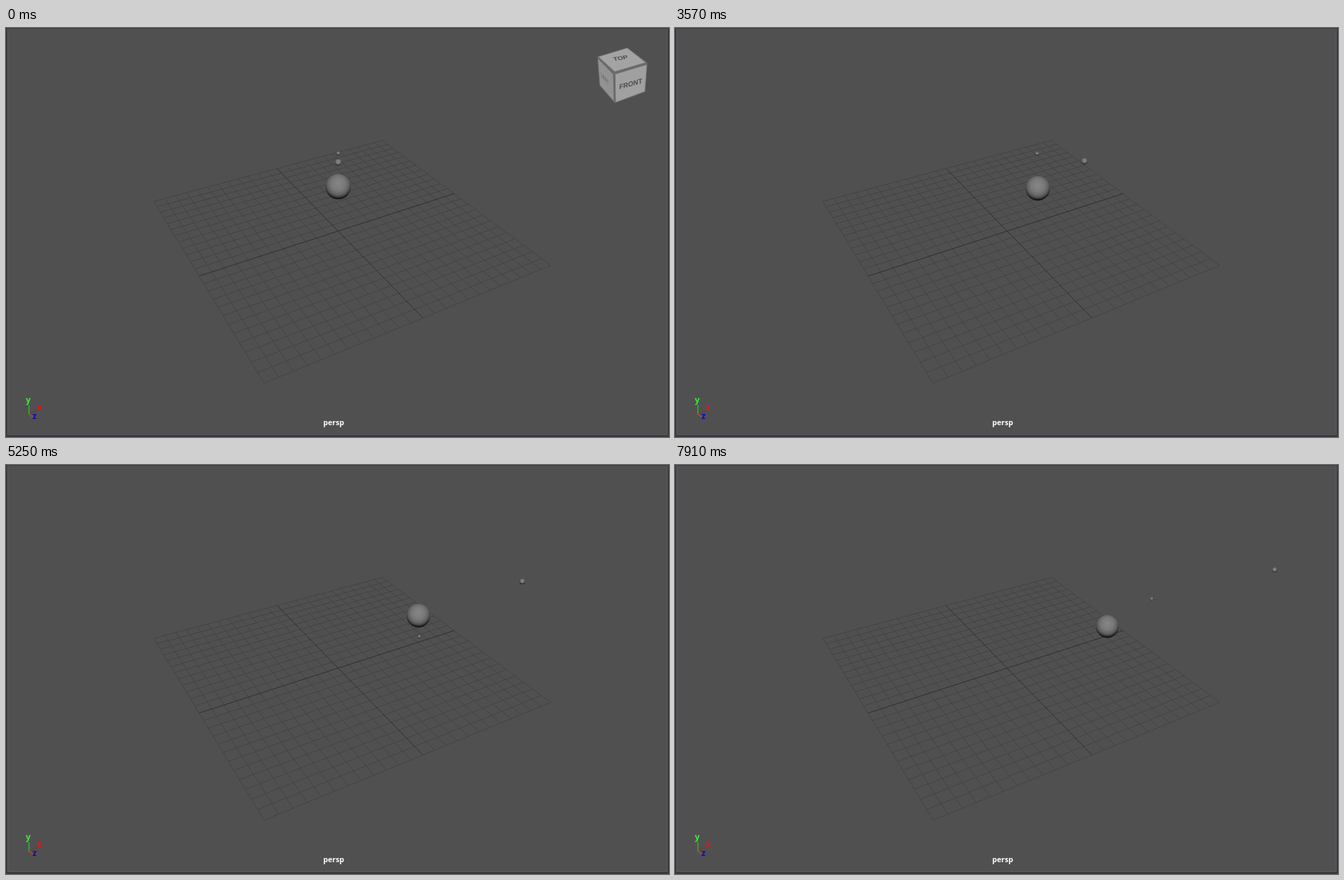
Recreate the animation shown at these times as an HTML page. Size 953 by 588 pixels, loop 8000 ms.

```html
<!DOCTYPE html>
<html lang="en">
<head>
<meta charset="utf-8">
<title>Bouncing balls</title>
<style>
  html, body { margin: 0; width: 100%; height: 100%; overflow: hidden; background: #3a3a3b; }
  svg { display: block; width: 953px; height: 588px; }
  text { text-anchor: middle; font-weight: 700; }
  .label { font-family: "Open Sans", "Noto Sans", sans-serif; }
  .cube { font-family: "Liberation Sans", Arial, sans-serif; fill: #4b4b4b; }
  .grid, .axis, .gizmo { fill: none; stroke-width: 1; }
  .grid { stroke: #434341; }
  .axis { stroke: #2e2e30; }
  .gizmo { stroke-width: 1.3; }
</style>
</head>
<body>
<svg viewBox="0 0 953 588">
  <defs>
    <radialGradient id="shade" cx=".5" cy=".4" r=".6" fx=".5" fy=".37">
      <stop offset="0" stop-color="#868686"/>
      <stop offset=".45" stop-color="#797979"/>
      <stop offset=".7" stop-color="#626262"/>
      <stop offset=".83" stop-color="#454545"/>
      <stop offset=".92" stop-color="#1c1c1c"/>
      <stop offset="1" stop-color="#0a0a0a"/>
    </radialGradient>
  </defs>
  <rect x="2.5" y=".5" width="948" height="584" fill="#505051" stroke="#5c5c68"/>
  <path d="M2 .5H951" stroke="#3e3e36"/>
  <path id="grid" class="grid"/>
  <path id="axis" class="axis"/>
  <g id="balls" fill="url(#shade)"></g>

  <g id="cube">
    <path d="M850 41L893 28L922 50L919 92L875 108L853 83Z" fill="#6b6b6b"/>
    <path d="M852 41.5L893 29L919 49.500L875 62.500Z" fill="#a3a3a3"/>
    <path d="M876 66.500L921 53L918 91L876.500 106.500Z" fill="#a0a0a0"/>
    <path d="M851 44.500L872.500 66.500L873.500 104.500L854 82Z" fill="#929292"/>
    <g class="cube">
      <text transform="matrix(.97 -.16 .2 .72 884 45.800)" font-size="10.500">TOP</text>
      <text transform="matrix(.96 -.27 0 1 898 83.700)" font-size="10">FRONT</text>
      <text transform="matrix(.5 .55 .08 1 861 76)" font-size="9" fill="#666">LEFT</text>
    </g>
  </g>

  <g class="gizmo">
    <path d="M33 542V556" stroke="#2fc22f"/>
    <path d="M33 555.500L45 549" stroke="#9c2626" stroke-dasharray="2 1"/>
    <path d="M33 555L39 560" stroke="#b5541c"/>
  </g>
  <g class="label" font-size="12">
    <text x="32" y="539" fill="#35f035">y</text>
    <text x="48" y="549" fill="#e01818">x</text>
    <text x="41" y="562" fill="#0808c4">z</text>
    <text x="471" y="571" font-size="10.700" fill="#fff">persp</text>
  </g>
</svg>
<script>
const LOOP = 8000, START = 2590, LAST = 7910;
const $ = id => document.getElementById(id);

// World point to screen; s is the size of one unit there.
function project(x, y, z) {
  const s = 917 / (52.8 + .4 * x - .576 * y - .712 * z);
  return {
    x: 477.5 + s * (.872 * x + .49 * z),
    y: 292 - s * (.282 * x + .817 * y - .502 * z),
    s
  };
}

function line(x1, z1, x2, z2) {
  const a = project(x1, 0, z1), b = project(x2, 0, z2);
  return `M${a.x.toFixed(1)} ${a.y.toFixed(1)}L${b.x.toFixed(1)} ${b.y.toFixed(1)}`;
}

function drawGrid() {
  const N = 12;
  let d = '';
  for (let i = -N; i <= N; i++) if (i) d += line(i, -N, i, N) + line(-N, i, N, i);
  $('grid').setAttribute('d', d);
  $('axis').setAttribute('d', line(0, -N, 0, N) + line(-N, 0, N, 0));
}

// Monotone cubic through [time, value] keys.
function curve(keys, t) {
  const n = keys.length - 1;
  if (t <= keys[0][0]) return keys[0][1];
  if (t >= keys[n][0]) return keys[n][1];
  const slope = i => (keys[i + 1][1] - keys[i][1]) / (keys[i + 1][0] - keys[i][0]);
  const tangent = i => {
    if (i === 0) return slope(0);
    if (i === n) return slope(n - 1);
    const a = slope(i - 1), b = slope(i);
    return a * b > 0 ? 2 * a * b / (a + b) : 0;
  };
  let i = 0;
  while (t > keys[i + 1][0]) i++;
  const [t0, v0] = keys[i], [t1, v1] = keys[i + 1];
  const w = t1 - t0, u = (t - t0) / w, q = 1 - u;
  return v0 + (v1 - v0) * u * u * (3 - 2 * u)
    + w * u * q * (q * tangent(i) - u * tangent(i + 1));
}

// First a fall, then one parabola between each pair of hits.
function height({ floor, drop, power, hits, peaks }, t) {
  if (t <= START) return floor + drop;
  if (t < hits[0]) return floor + drop * (1 - ((t - START) / (hits[0] - START)) ** power);
  for (let i = 0; i < peaks.length; i++) {
    if (t < hits[i + 1]) {
      const u = (t - hits[i]) / (hits[i + 1] - hits[i]);
      return floor + 4 * peaks[i] * u * (1 - u);
    }
  }
  return floor;
}

const balls = [
  { r: 1, floor: 1, drop: 3.29, power: 2, hits: [4360, 6020, 6880], peaks: [1.77, .5],
    path: [[START, 0], [3570, 2.86], [4650, 6.26], [5910, 9.15], [6890, 10.12], [6990, 10.13], [LOOP, 10.13]] },
  { r: .25, floor: .25, drop: 6.23, power: 1.84, hits: [4460, 6540, 8260], peaks: [2.98, 1.85],
    path: [[START, 0], [3570, 7.38], [4650, 15.57], [5910, 23.22], [6890, 27.53], [LAST, 30.94]] },
  { r: .14, floor: .13, drop: 7.13, power: 2.33, hits: [5190, 7310, 8810], peaks: [4.07, 2.45],
    path: [[START, 0], [3570, 2.7], [4650, 6.19], [5910, 10.15], [6890, 12.7], [LAST, 14.9]] }
];

for (const b of balls) {
  b.node = document.createElementNS('http://www.w3.org/2000/svg', 'circle');
  $('balls').append(b.node);
}

function render(time) {
  const t = Math.min(time % LOOP, LAST);
  $('cube').style.display = t < START ? '' : 'none';
  for (const b of balls) {
    const p = project(curve(b.path, t), height(b, t), 0);
    b.node.setAttribute('cx', p.x.toFixed(2));
    b.node.setAttribute('cy', p.y.toFixed(2));
    b.node.setAttribute('r', (b.r * p.s).toFixed(2));
  }
}

let begin;
function tick(now) {
  begin ??= now;
  render(now - begin);
  requestAnimationFrame(tick);
}

drawGrid();
render(0);
requestAnimationFrame(tick);
</script>
</body>
</html>
```
